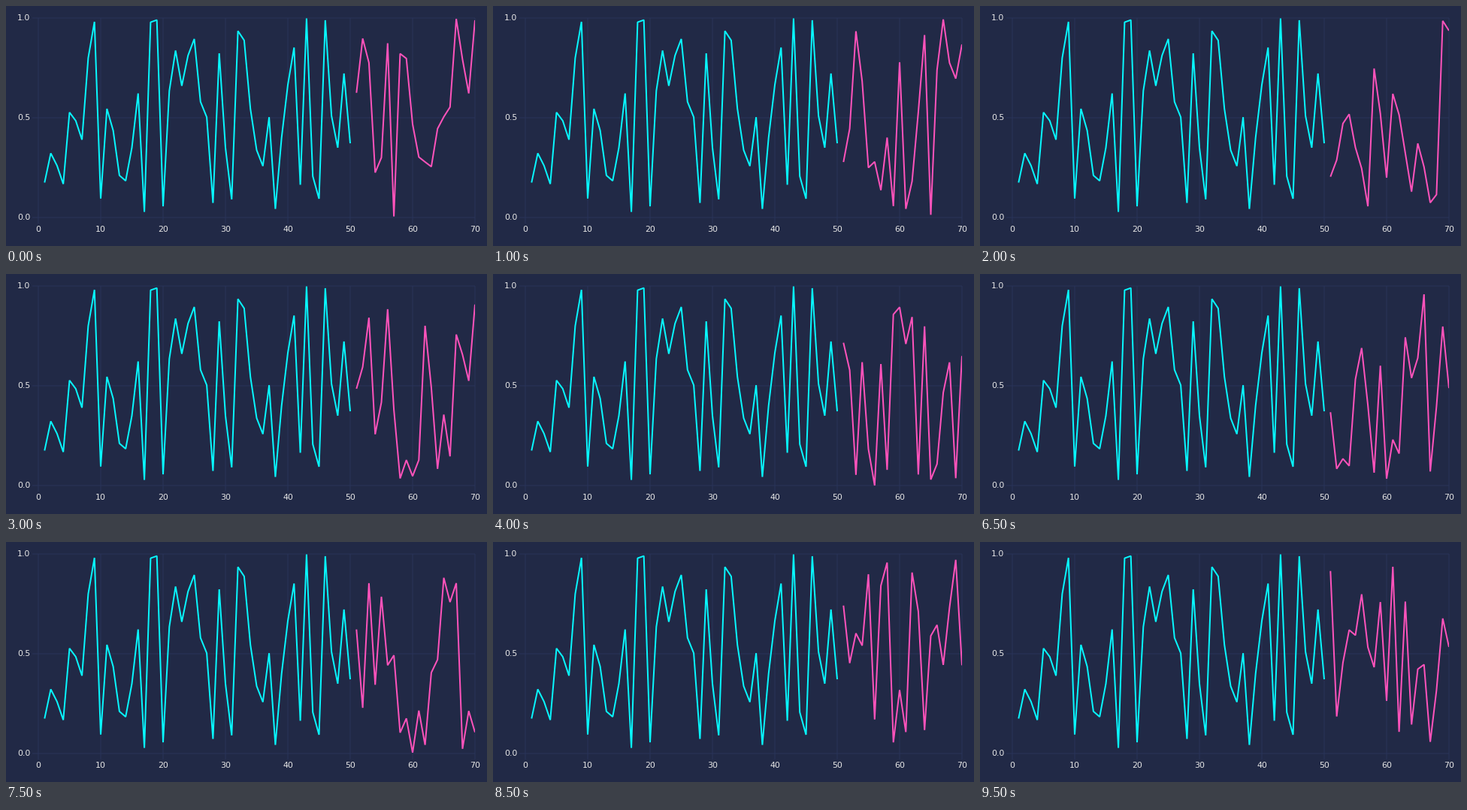
Write a matplotlib script that moves like this. It is 640x320 px and loops after 10 s.

```python
import matplotlib.pyplot as plt
import numpy as np
from matplotlib.animation import FuncAnimation
from matplotlib.patches import Rectangle

WIDTH, HEIGHT, DPI = 640, 320, 100
LEFT, RIGHT, TOP, BOTTOM = 43, 624, 16, 282
TICK = 8
BACKGROUND, GRID, TEXT = "#212946", "#2a3459", "#e6e6e6"
CYAN, PINK = "#08f7fe", "#fe53bb"
FRAMES, INTERVAL = 20, 500
HORIZON, SEED = 20, 7

HISTORY = [
    .175, .322, .26, .168, .527, .485, .39, .80, .981, .095,
    .545, .436, .211, .184, .35, .622, .028, .979, .99, .056,
    .635, .837, .66, .812, .895, .58, .503, .073, .823, .35,
    .091, .935, .888, .545, .338, .258, .503, .043, .40, .665,
    .852, .164, .998, .207, .094, .989, .51, .35, .722, .372,
]


def to_x(n):
    return LEFT + np.asarray(n) * (RIGHT - LEFT) / 70


def to_y(value):
    return BOTTOM - np.asarray(value) * (BOTTOM - TOP)


def px(size):
    return size * 72 / DPI


def forecast(step):
    """A fresh set of uniform random values for each step."""
    return np.random.default_rng([SEED, step]).random(HORIZON)


plt.rcParams["path.simplify"] = False
fig = plt.figure(figsize=(WIDTH / DPI, HEIGHT / DPI), dpi=DPI, facecolor=BACKGROUND)
ax = fig.add_axes([0, 0, 1, 1])
ax.set(xlim=(0, WIDTH), ylim=(HEIGHT, 0))
ax.axis("off")


def grid_line(xs, ys):
    ax.plot(xs, ys, color=GRID, linewidth=px(1), solid_capstyle="butt", snap=False)


def label(x, y, text, align):
    ax.text(x, y, text, ha=align, va="center", color=TEXT,
            fontsize=px(11), family="DejaVu Sans")


def series(values, start, color):
    n = start + np.arange(len(values))
    line, = ax.plot(to_x(n), to_y(values), color=color, linewidth=px(2),
                    solid_joinstyle="bevel", solid_capstyle="butt")
    line.set_clip_path(Rectangle((LEFT, TOP - 1), RIGHT - LEFT, BOTTOM - TOP + 2,
                                 transform=ax.transData))
    return line


for tick in range(0, 71, 10):
    x = to_x(tick)
    grid_line([x, x], [TOP, BOTTOM + TICK])
    label(x, 298, str(tick), "center")
for tick in (0, .5, 1):
    y = to_y(tick)
    grid_line([LEFT - TICK, RIGHT], [y, y])
    label(32.5, y, f"{tick:.1f}", "right")

series(HISTORY, 1, CYAN)
future = series(forecast(0), len(HISTORY) + 1, PINK)


def update(step):
    future.set_ydata(to_y(forecast(step)))
    return future,


anim = FuncAnimation(fig, update, frames=FRAMES, interval=INTERVAL,
                     repeat=True, repeat_delay=0)
plt.show()
```
